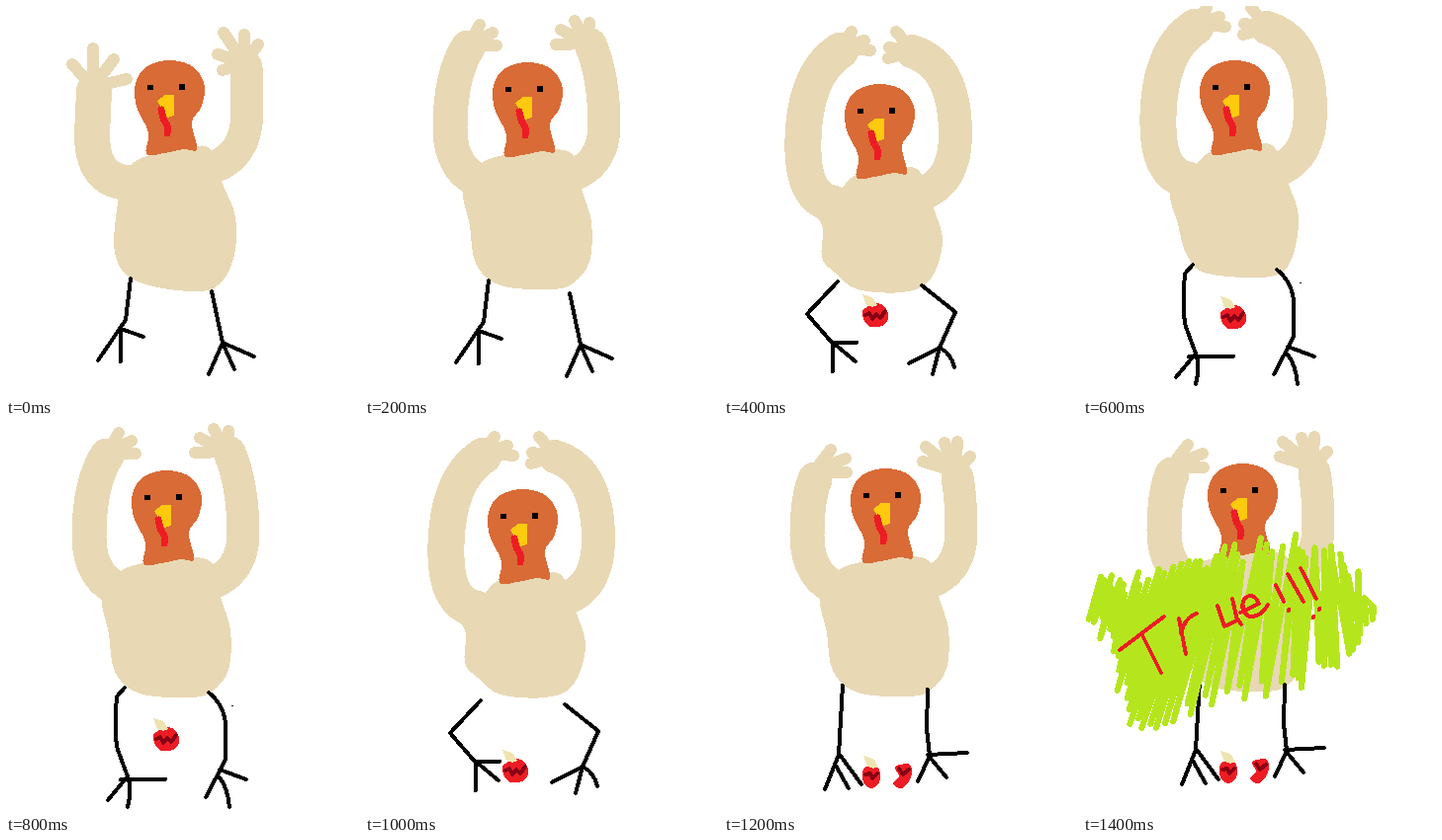
Write an HTML page that moves like this. It is 357x394 px and loops after 1.8 s.

```html
<!DOCTYPE html>
<html lang="en">
<head>
<meta charset="utf-8">
<title>Dancing turkey</title>
<style>
html, body { margin: 0; width: 100%; height: 100%; overflow: hidden; background: #fff; }
svg { display: block; width: 100%; height: 100%; }
.pose { visibility: hidden; }
.on { visibility: visible; }
path { fill: none; stroke-linecap: round; stroke-linejoin: round; }
</style>
</head>
<body>
<svg id="stage" viewBox="0 0 357 394" shape-rendering="crispEdges"></svg>
<script>
const SKIN = '#e8d8b4', HEAD = '#d96b36', RED = '#ed1c24', DARK = '#880015',
      YELLOW = '#ffc90e', CREAM = '#efe4b0', GREEN = '#b5e61d', BLACK = '#000';
const LOOP = 1800, STEP = 200;

const line = (d, color, width) => `<path d="${d}" stroke="${color}" stroke-width="${width}"/>`;
const area = (d, color) => `<path d="${d}Z" style="fill:${color}"/>`;
const move = (x, y, art) => `<g transform="translate(${x} ${y})">${art}</g>`;
const arm = (d, width) => line(d, SKIN, width);

// Lines from one palm point to each fingertip
const hand = (palm, tips) => line(tips.split(',').map(tip => `M${palm}L${tip}`).join(''), SKIN, 12);

// Closed smooth outline through a few points
function blob(text, color) {
  const p = text.split(',').map(s => s.trim().split(' ').map(Number)), n = p.length;
  const at = i => p[(i + n) % n];
  let d = `M${p[0]}`;
  for (let i = 0; i < n; i++) {
    const ctrl = (a, b, c, s) => [0, 1].map(k => at(a)[k] + s * (at(c)[k] - at(b)[k]) / 6);
    d += `C${ctrl(i, i - 1, i + 1, 1)} ${ctrl(i + 1, i, i + 2, -1)} ${at(i + 1)}`;
  }
  return area(d, color);
}

const wide =
  arm('M89 86L87 130Q87 178 125 179', 36) + arm('M243 62V120Q238 158 200 166', 33) +
  hand('88 82', '67 59,88 43,109 54,122 74') + hand('241 58', '219 65,214 49,220 27,241 29,255 39') +
  blob(`123 164,145 151,180 145,206 144,219 180,232 214,230 256,210 286,165 287,
    125 275,110 250,111 214,116 185`, SKIN);

const arch =
  arm('M118 45Q82 68 80 135Q78 195 110 200', 37) + arm('M190 46Q234 60 234 130Q234 178 200 190', 34) +
  hand('117 42', '129 26,142 35,148 45') + hand('191 45', '174 26,167 42,166 53');
const squat = arch + blob(`116 187,134 171,160 170,195 165,212 205,221 240,208 278,180 290,
    135 287,112 270,99 255,100 225,92 205`, SKIN);
const tall = arch + blob(`116 187,134 171,160 170,195 165,212 205,222 238,215 280,194 298,
    130 295,109 276,100 245,92 210`, SKIN);

const chest = blob(`112 153,138 142,190 136,211 145,217 176,227 210,225 250,208 272,185 278,
    135 274,110 252,104 213,97 178`, SKIN);
const high =
  arm('M102 33Q84 62 84 115Q84 158 118 170', 35) + arm('M226 30Q240 62 240 115Q238 155 200 165', 33) +
  hand('102 32', '114 10,127 18,131 31') + hand('223 29', '191 30,196 15,210 6,225 8') + chest;
const wave =
  arm('M92 58Q84 78 84 115Q84 158 118 170', 35) + arm('M236 56Q240 78 240 115Q238 155 200 165', 33) +
  hand('91 50', '108 28,123 37,124 51') + hand('234 50', '201 40,204 25,223 21,236 20,249 35') + chest;

const limb = d => line(d, BLACK, 4);
const stand = limb(`M126 276L121 318L93 359M116 360V327L139 335
  M208 289L219 341L205 373M231 368L219 341L251 355`);
const crouch = limb(`M115 279L84 312L110 342V370M133 360L110 341H134
  M200 283L234 310L218 346L187 362M211 373L218 346Q230 352 233 366`);
const bow = limb(`M111 262L103 271Q100 310 104 325L114 352L94 376M114 352Q119 364 114 383M107 355H152
  M196 267Q212 280 213 300V335L193 373M206 352Q215 362 217 383M207 345L234 355`);
const plain = limb(`M120 266L116 336L102 371M113 347L126 370M117 336L139 366
  M206 270L205 310L208 337L196 363M225 359L206 336L246 334`);

const head =
  blob(`166 55,190 62,201 82,197 103,188 118,193 145,180 145,160 149,142 150,
    144 128,132 102,131 78,143 61`, HEAD) +
  area('M143 80h6v5h-6zM175 79h6v6h-6', BLACK) +
  area('M153 96L161 90H170V111L163 113L159 106', YELLOW) +
  line('M157 105L159 114L163 121V129', RED, 7);

const stem = area('M-13 -21L-3 -18L2 -10L-3 -8L-9 -10', CREAM);
const egg = blob('-13 -4,3 -12,13 -2,9 10,-7 11', RED) +
  line('M-10 0L-6 -2L-3 4L1 -1L5 3L10 -4', DARK, 4) + stem;
const halves =
  blob('141 350,149 348,157 351,157 364,149 370,141 364', RED) +
  line('M143 356L148 355L150 360L155 355', DARK, 4) +
  blob('173 348,188 346,189 359,180 370,171 365,177 358', RED) +
  line('M177 350L181 356L187 351', DARK, 4) + move(154, 358, stem);

function random(seed) {
  return () => (seed = seed * 16807 % 2147483647) / 2147483647;
}

function along(points, t) {
  const p = t * (points.length - 1), i = Math.min(points.length - 2, Math.floor(p)), k = p - i;
  return [0, 1].map(n => points[i][n] * (1 - k) + points[i + 1][n] * k);
}

// One long scribble bouncing between an upper and a lower edge
function grass() {
  const top = [[18, 156], [60, 148], [115, 138], [158, 118], [224, 112], [262, 118], [302, 176]];
  const low = [[3, 198], [28, 255], [48, 328], [118, 290], [200, 277], [262, 252], [292, 196]];
  const rnd = random(77), count = 90;
  let d = '';
  for (let i = 0; i <= count; i++) {
    const [x, y] = along(i % 2 ? low : top, i / count);
    const pull = rnd() * 24 * (i % 2 ? -1 : 1);
    d += `${i ? 'L' : 'M'}${(x - pull * .4).toFixed(1)} ${(y + pull).toFixed(1)}`;
  }
  return line(d, GREEN, 6);
}

const shout = line(`M37 230L82 196M59 213L79 253M97 198L104 234M99 213Q103 197 115 193
  M136 185L143 206L156 200L151 178M156 198L160 204
  M159 192L178 183Q172 170 163 178Q158 190 168 196Q180 197 187 184`, RED, 4) +
  line(`M195 164l8 17M208 189v1M207 153l16 28M233 196v1M220 147l16 31M239 188v1`, RED, 4);

const speck = area('M219 280h2v1h-2', BLACK);
const bowed = bow + speck;

const poses = [
  wide + stand + head,
  move(2, 9, high) + move(-1, 2, stand + head),
  squat + crouch + move(-8, 24, head) + move(153, 313, egg),
  move(-4, -24, tall) + bowed + move(-12, 0, head) + move(152, 315, egg),
  high + move(9, 6, bowed) + move(-3, -7, head) + move(162, 320, egg),
  move(2, -12, squat) + move(2, 2, crouch) + move(-6, 12, head) + move(152, 352, egg),
  move(0, -1, wave) + plain + move(-2, -9, head) + halves,
  move(-2, -5, move(0, -1, wave) + plain + move(-2, -9, head) + halves) + grass() + shout
];

const stage = document.getElementById('stage');
stage.innerHTML = poses.map(art => `<g class="pose">${art}</g>`).join('');
const groups = [...stage.children];

const start = performance.now();
function draw() {
  const t = (performance.now() - start) % LOOP;
  const now = Math.min(groups.length - 1, Math.floor(t / STEP));
  groups.forEach((g, i) => g.classList.toggle('on', i === now));
  requestAnimationFrame(draw);
}
draw();
</script>
</body>
</html>
```
